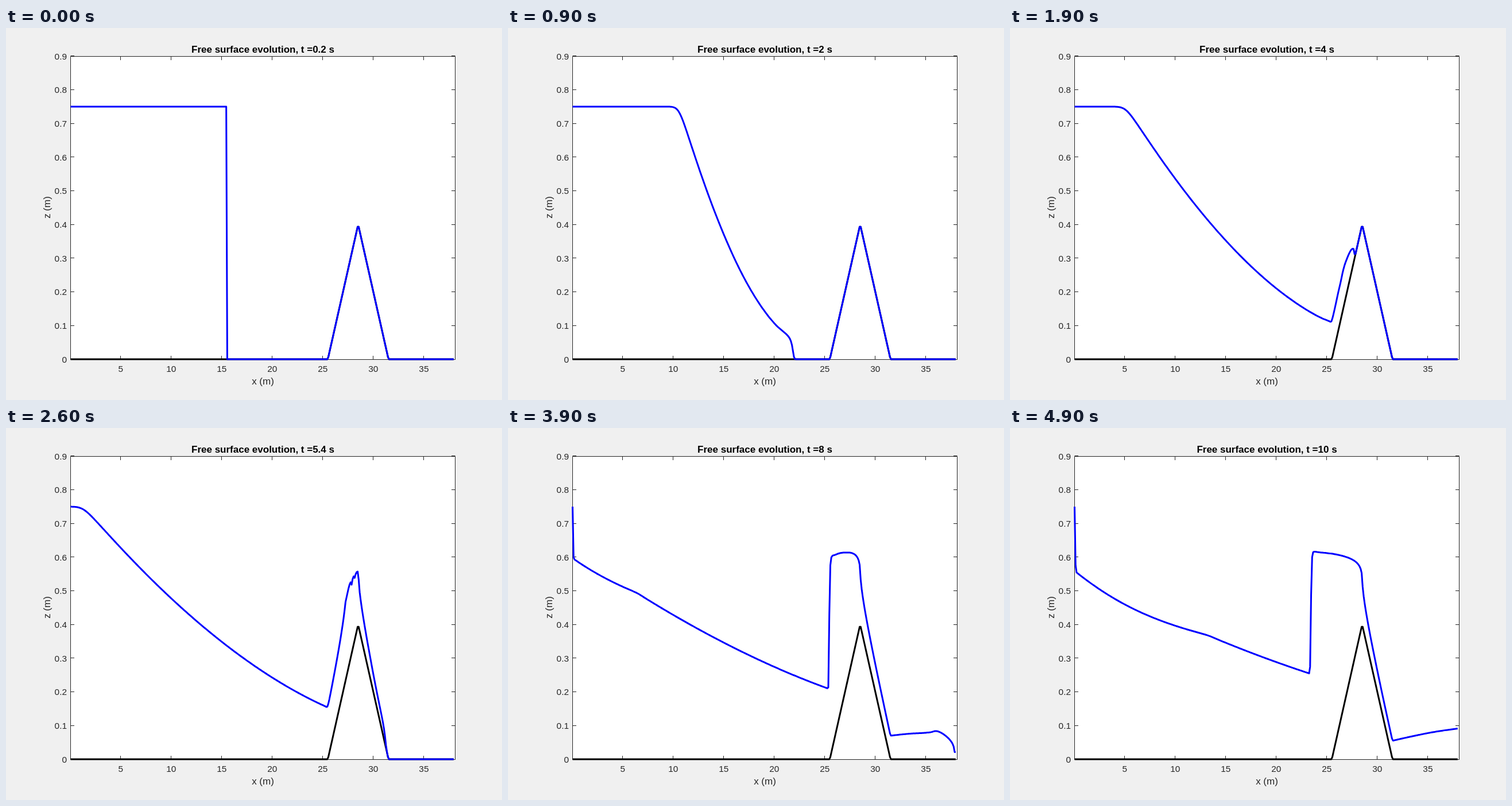
These frames come from a looping animation (864 by 648 pixels, 5000 ms). An HTML page:

```html
<!DOCTYPE html>
<html lang="en">
<head>
<meta charset="utf-8">
<title>Free surface evolution</title>
<style>
  html, body { margin: 0; width: 100%; height: 100%; overflow: hidden; background: #f0f0f0; }
  svg { display: block; width: 864px; height: 648px; }
  text { font-family: "Liberation Sans", Arial, sans-serif; font-size: 15.4px; fill: #262626; text-anchor: middle; }
  .name { font-size: 17px; }
  #title { font-size: 17px; font-weight: bold; fill: #000; }
  #axes path { fill: none; stroke: #262626; stroke-width: 1; }
  polyline { fill: none; stroke-width: 3; stroke-linejoin: round; }
</style>
</head>
<body>
<svg viewBox="0 0 864 648">
  <rect x="112.5" y="49.5" width="670" height="528" fill="#fff"/>
  <g id="axes"></g>
  <text id="title" x="447.5" y="42.5"></text>
  <text class="name" x="447.5" y="620.5">x (m)</text>
  <text class="name" transform="translate(76.5 312.5) rotate(-90)">z (m)</text>
  <polyline id="bed" stroke="#000"/>
  <polyline id="water" stroke="#00f"/>
</svg>
<script>
const $ = id => document.getElementById(id);
const px = x => 112.5 + (x - 0.05) * 17.608;
const py = z => 577 - z * 586.67;
const crisp = v => Math.floor(v) + 0.5;

function drawAxes() {
  let path = 'M112.5 49.5H782.5V577.5H112.5Z', labels = '';
  for (let x = 5; x <= 35; x += 5) {
    const p = crisp(px(x));
    path += `M${p} 577.5v-6.5M${p} 49.5v6.5`;
    labels += `<text x="${px(x)}" y="598.5">${x}</text>`;
  }
  for (let k = 0; k <= 9; k++) {
    const p = crisp(py(k / 10));
    path += `M112.5 ${p}h6.5M782.5 ${p}h-6.5`;
    labels += `<text x="106" y="${py(k / 10) + 5.8}" style="text-anchor:end">${k / 10}</text>`;
  }
  $('axes').innerHTML = `<path d="${path}"/>` + labels;
}

// Dam break over a triangular sill: shallow water equations, second-order
// HLL fluxes with hydrostatic reconstruction and Manning friction.
const N = 380, DX = 0.1, G = 9.81, MANNING = 0.0125, DEPTH = 0.75, DRY = 1e-4;
const FRAMES = 50, SPAN = 0.2, STEPS = 20, DT = SPAN / STEPS;
const xs = Array.from({ length: N }, (_, i) => 0.05 + i * DX);
const bed = xs.map(x => Math.max(0, 0.4 - Math.abs(x - 28.5) * 0.4 / 3));
let h = xs.map(x => x < 15.5 ? DEPTH : 0);
let q = xs.map(() => 0);

const minmod = (a, b) => a * b <= 0 ? 0 : Math.abs(a) < Math.abs(b) ? a : b;

function hll(hl, ul, hr, ur) {
  const dryL = hl < 1e-6, dryR = hr < 1e-6;
  if (dryL && dryR) return [0, 0];
  const cl = Math.sqrt(G * hl), cr = Math.sqrt(G * hr);
  const us = (ul + ur) / 2 + cl - cr, cs = Math.abs((cl + cr) / 2 + (ul - ur) / 4);
  const sl = dryL ? ur - 2 * cr : dryR ? ul - cl : Math.min(ul - cl, us - cs);
  const sr = dryR ? ul + 2 * cl : dryL ? ur + cr : Math.max(ur + cr, us + cs);
  const ql = hl * ul, qr = hr * ur;
  const fl = [ql, ql * ul + G * hl * hl / 2];
  const fr = [qr, qr * ur + G * hr * hr / 2];
  if (sl >= 0) return fl;
  if (sr <= 0) return fr;
  const mix = (a, b, d) => (sr * a - sl * b + sl * sr * d) / (sr - sl);
  return [mix(fl[0], fr[0], hr - hl), mix(fl[1], fr[1], qr - ql)];
}

// Still water outside the left end; its level sags once the wave gets there.
function outerDepth(t) {
  const s = Math.max(0, t - 5.7);
  const c = Math.sqrt(G * DEPTH) + 0.025 * s * (s - 3.9);
  return c * c / G;
}

// Depth, level and speed at both edges of every cell.
function edges() {
  const u = h.map((d, i) => d > DRY ? q[i] / d : 0);
  const level = h.map((d, i) => d + bed[i]);
  return h.map((d, i) => {
    const inner = i > 0 && i < N - 1 && Math.min(h[i - 1], d, h[i + 1]) > DRY;
    const half = f => inner ? minmod(f[i] - f[i - 1], f[i + 1] - f[i]) / 2 : 0;
    const dh = half(h), dl = half(level), du = half(u);
    const side = s => ({ h: d + s * dh, z: level[i] - d + s * (dl - dh), u: u[i] + s * du });
    return [side(-1), side(1)];
  });
}

function euler() {
  const cells = edges(), mass = [], leftMom = [], rightMom = [];
  for (let i = 0; i < N - 1; i++) {
    const a = cells[i][1], b = cells[i + 1][0], top = Math.max(a.z, b.z);
    const hl = Math.max(0, a.h + a.z - top), hr = Math.max(0, b.h + b.z - top);
    const [m, p] = hll(hl, a.u, hr, b.u);
    mass[i] = m;
    leftMom[i] = p + G / 2 * (a.h * a.h - hl * hl);
    rightMom[i] = p + G / 2 * (b.h * b.h - hr * hr);
  }
  for (let i = 1; i < N - 1; i++) {
    const [a, b] = cells[i];
    const push = G / 2 * (a.h + b.h) * (a.z - b.z);
    h[i] = Math.max(0, h[i] - DT / DX * (mass[i] - mass[i - 1]));
    q[i] -= DT / DX * (leftMom[i] - rightMom[i - 1] - push);
    if (h[i] <= DRY) q[i] = 0;
  }
  h[N - 1] = h[N - 2];
  q[N - 1] = q[N - 2];
}

function step(t) {
  h[0] = outerDepth(t);
  const h0 = h.slice(), q0 = q.slice();
  euler();
  euler();
  h = h.map((d, i) => (d + h0[i]) / 2);
  q = q.map((f, i) => {
    f = (f + q0[i]) / 2;
    return h[i] > DRY ? f / (1 + DT * G * MANNING ** 2 * Math.abs(f) / h[i] ** (7 / 3)) : 0;
  });
}

const line = zs => zs.map((z, i) => px(xs[i]).toFixed(2) + ',' + py(z).toFixed(2)).join(' ');

function solve() {
  const lines = [];
  for (let k = 0; k < FRAMES; k++) {
    lines.push(line(h.map((d, i) => i ? d + bed[i] : DEPTH)));
    for (let s = 0; s < STEPS; s++) step(k * SPAN + s * DT);
  }
  return lines;
}

drawAxes();
$('bed').setAttribute('points', line(bed));
const surfaces = solve();
let shown = -1;

function draw() {
  const k = Math.floor(performance.now() / 100) % FRAMES;
  if (k !== shown) {
    shown = k;
    $('water').setAttribute('points', surfaces[k]);
    $('title').textContent = `Free surface evolution, t =${+((k + 1) * SPAN).toFixed(1)} s`;
  }
  requestAnimationFrame(draw);
}
draw();
</script>
</body>
</html>
```
